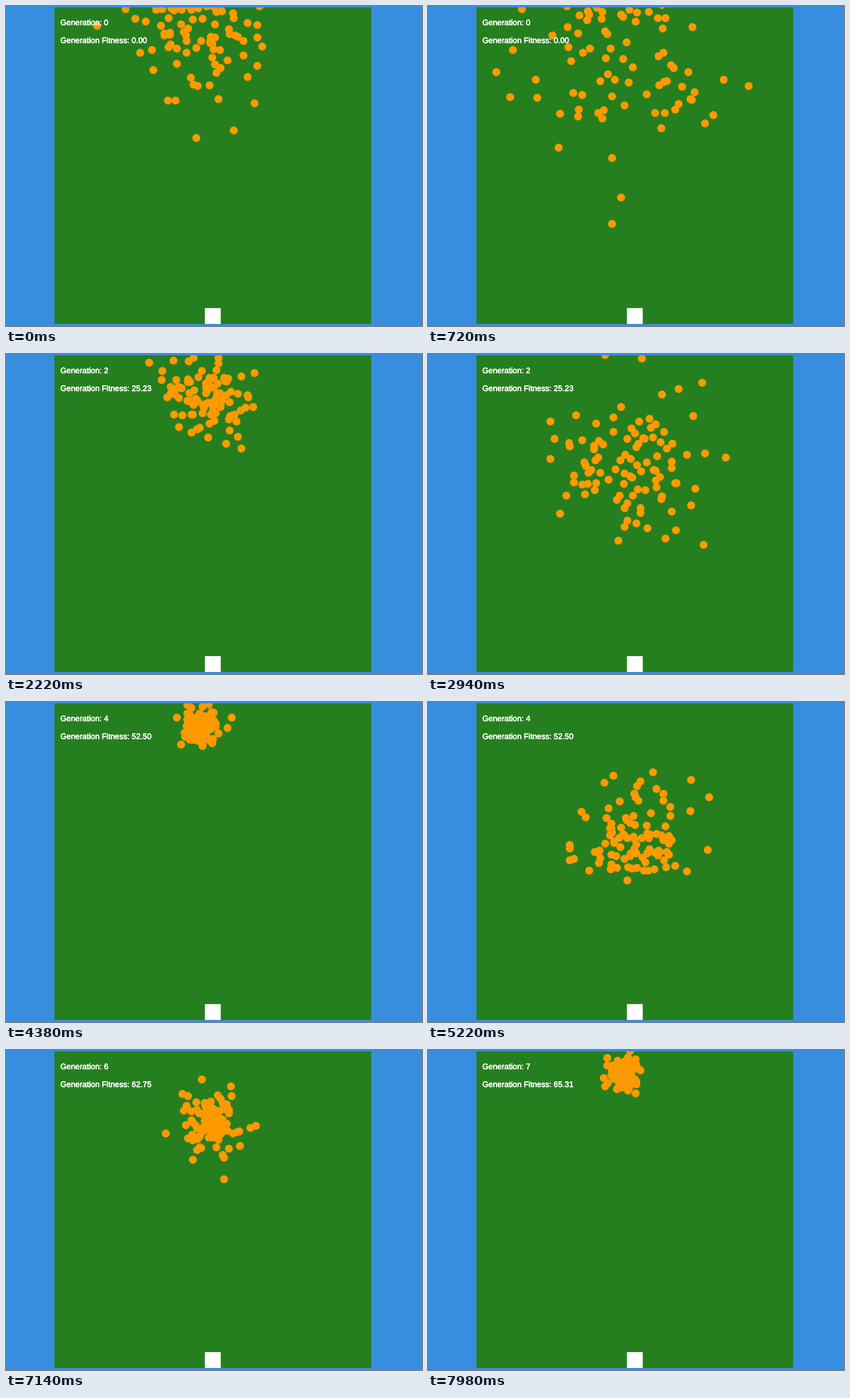
Animation of 600 by 462 pixels, one loop 8 s. Source, as a matplotlib script:

```python
import numpy as np
import matplotlib.pyplot as plt
from matplotlib import patheffects
from matplotlib.animation import FuncAnimation
from matplotlib.patches import Rectangle

W, H, DPI = 600, 462, 100
BLUE, GREEN, ORANGE = "#388ede", "#267f1e", "#ff9900"
UNIT = 457 / 800            # pixels per world unit, the field is 800 wide
LEFT, TOP = 69.8, 2.0
DOTS, STEPS = 100, 20       # dots per generation, picture steps per generation
FIRST = 7                   # the loop opens this far into generation 0
LEAD = 1.8                  # steps walked before a generation is first drawn
HOLD = 3                    # 20 ms ticks per picture step
START_X, START_Y = 281, 14
FITNESS = [0, 11.36, 25.23, 41.07, 52.50, 58.18, 62.75, 65.31]


def walk(gen):
    """Random walks of one generation, shape (STEPS, DOTS, 2).

    Later generations have learned to fall faster, stray less and
    turn towards the middle of the field.
    """
    rng = np.random.default_rng(40 + gen)
    learned = 1 - np.exp(-(gen / 2) ** 2)
    fall = 2.2 + 9.4 * learned
    stray = 9 + 8 * np.exp(-(gen / 2.6) ** 2)

    moves = rng.normal(0, stray, (STEPS, DOTS, 2))
    moves -= moves.mean(axis=1, keepdims=True)
    moves[0] *= np.sqrt(LEAD)
    k = np.arange(STEPS)
    x = START_X + 17 * learned * (1 - np.exp(-k / 3))
    y = START_Y + fall * (k + LEAD)
    return np.column_stack((x, y))[:, None] + moves.cumsum(axis=0)


paths = [walk(gen) for gen in range(len(FITNESS))]

fig = plt.figure(figsize=(W / DPI, H / DPI), dpi=DPI, facecolor=BLUE)
ax = fig.add_axes([0, 0, 1, 1])
ax.set_xlim(0, W)
ax.set_ylim(H, 0)
ax.axis("off")


def square(x, y, size, color):
    """Filled square placed in world units."""
    return ax.add_patch(Rectangle(
        (LEFT + x * UNIT, TOP + y * UNIT), size * UNIT, size * UNIT,
        fc=color, lw=0, snap=False))


field = square(0, 0, 800, GREEN)
square(380, 760, 40, "white")

px = 72 / DPI
dots, = ax.plot([], [], "o", ms=20 * UNIT * px, mew=0, color=ORANGE,
                snap=False)
dots.set_clip_path(field)


def label(y):
    text = ax.text(LEFT + 15 * UNIT, TOP + y * UNIT, "", color="white",
                   family="Liberation Sans", size=20 * UNIT * px,
                   va="baseline", zorder=5)
    text.set_path_effects(
        [patheffects.withStroke(linewidth=0.3, foreground="white")])
    return text


title, score = label(45), label(90)


def update(tick):
    gen, k = divmod(tick // HOLD + FIRST, STEPS)
    dots.set_data(*paths[gen][k].T)
    title.set_text(f"Generation: {gen}")
    score.set_text(f"Generation Fitness: {FITNESS[gen]:.2f}")
    return dots, title, score


anim = FuncAnimation(fig, update, frames=400, interval=20,
                     repeat=True, repeat_delay=0)
plt.show()
```
